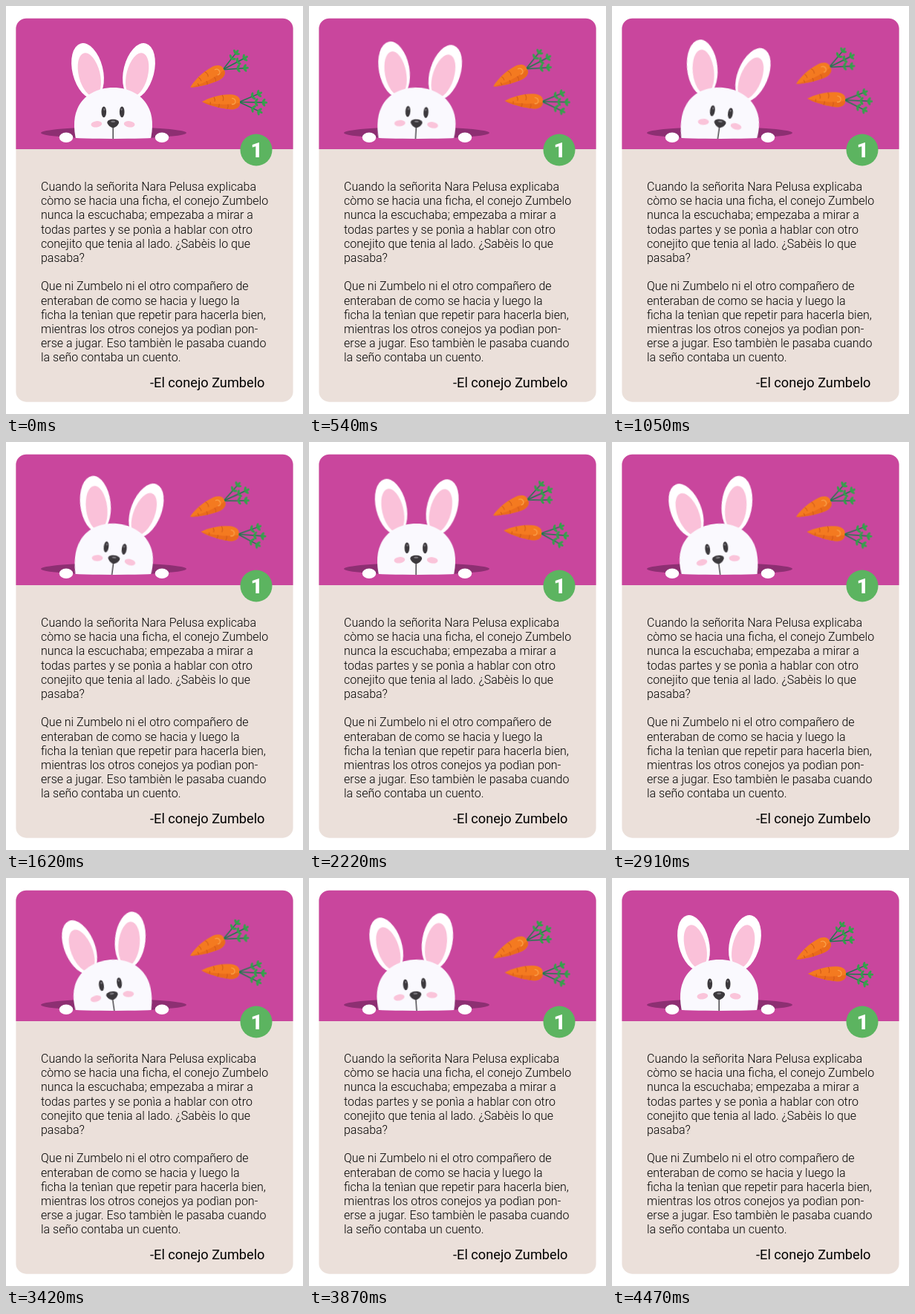
Write an HTML page that moves like this. It is 400x550 px and loops after 4.5 s.

```html
<!DOCTYPE html>
<html lang="es">
<head>
<meta charset="utf-8">
<title>El conejo Zumbelo</title>
<style>
  html, body { margin: 0; width: 100%; height: 100%; overflow: hidden; background: #fff; }
  svg { display: block; width: 400px; height: 550px; }
  text { font-family: Roboto, sans-serif; fill: #000; }
  #story { font-size: 16px; font-weight: 300; }
  #sign { font-size: 18.2px; }
  #num { font-size: 28px; font-weight: 900; fill: #fff; }
  #bunny { transform-origin: 145px 167px; }
  #carrots { transform-origin: 402px 100px; }
</style>
</head>
<body>
<svg viewBox="0 0 400 550">
  <defs>
    <clipPath id="card"><rect x="13.4" y="16.7" width="373.2" height="517" rx="14"/></clipPath>
    <clipPath id="hole"><path d="M0 0H400V171H243A98 8 0 0 1 47 171H0Z"/></clipPath>
    <g id="ear">
      <ellipse cx="110" cy="87.3" rx="20.5" ry="38" transform="rotate(-14 110 87.3)" fill="#fff"/>
      <ellipse cx="112.3" cy="92.5" rx="14.3" ry="30" transform="rotate(-14 112.3 92.5)" fill="#fac1d9"/>
    </g>
    <g id="face">
      <ellipse cx="131.8" cy="142.8" rx="3.3" ry="7.4" fill="#3c393d"/>
      <ellipse cx="132.3" cy="139.5" rx="1" ry="1.4" fill="#77747a"/>
      <ellipse cx="121.8" cy="159.3" rx="7.4" ry="4.2" transform="rotate(-8 122 159)" fill="#fac4da"/>
    </g>
    <g id="carrot">
      <g id="leaves"></g>
      <path d="M0 .5C9-5 24-10 38-10C48-10 52-5 51 0C52 6 47 10.5 38 10C24 9 9 5 0 .5Z" fill="#f47a20"/>
      <path d="M0 .5C15 4 35 5 51 1C52 6 47 10.5 38 10C24 9 9 5 0 .5Z" fill="#ea6b1c"/>
      <path d="M16-6q2 3 1 6M27-9q3 4 1 8M22 8q2-3 1-5M34 9.5q2-3 1-6M11 4.5q1-2 0-4" fill="none" stroke="#cf5a17"/>
      <path d="M40-5q5 0 5 5q-1 4-5 3" fill="none" stroke="#f9a04a" stroke-width="1.3"/>
    </g>
  </defs>

  <g clip-path="url(#card)">
    <rect width="400" height="550" fill="#ebe0da"/>
    <rect width="400" height="193" fill="#c9469d"/>
  </g>

  <ellipse cx="145" cy="171" rx="98" ry="7.7" fill="#8d2f72"/>
  <g clip-path="url(#hole)">
    <g id="bunny">
      <use href="#ear"/>
      <use href="#ear" transform="translate(289) scale(-1 1)"/>
      <path d="M97 190C91 172 90 152 96 139C104 120 123 110 144.500 110S185 120 193 139C199 152 198 172 192 190Z" fill="#faf9fe"/>
      <use href="#face"/>
      <use href="#face" transform="translate(288) scale(-1 1)"/>
      <path d="M144.200 160V190" stroke="#4a474b" stroke-width="1.500"/>
      <path id="nose" d="M144.200 152.800C149 152.800 152.300 154.300 152 157.300C151.700 160.300 147.200 164.300 144.200 164.300S136.700 160.300 136.400 157.300C136.100 154.300 139.700 152.800 144.200 152.800Z" fill="#3c393d"/>
      <ellipse cx="144.200" cy="155.800" rx="3" ry="1.300" fill="#77747a"/>
    </g>
  </g>
  <ellipse cx="81" cy="177.300" rx="9.200" ry="6.700" fill="#fff"/>
  <ellipse cx="210" cy="177.300" rx="9.200" ry="6.700" fill="#fff"/>

  <g id="carrots">
    <use href="#carrot" transform="translate(248 109.200) rotate(-28)"/>
    <use href="#carrot" transform="translate(264 128.600) rotate(1)"/>
  </g>

  <circle cx="337" cy="194" r="21.500" fill="#5cb460"/>
  <text id="num" x="337.500" y="204" text-anchor="middle">1</text>
  <g id="story"></g>
  <text id="sign" x="348.500" y="514" text-anchor="end">-El conejo Zumbelo</text>
</svg>
<script>
const $ = id => document.getElementById(id);
const add = (parent, tag, attrs) => {
  const el = document.createElementNS('http://www.w3.org/2000/svg', tag);
  for (const key in attrs) el.setAttribute(key, attrs[key]);
  return parent.appendChild(el);
};

const lines = [
  'Cuando la señorita Nara Pelusa explicaba',
  'còmo se hacia una ficha, el conejo Zumbelo',
  'nunca la escuchaba; empezaba a mirar a',
  'todas partes y se ponìa a hablar con otro',
  'conejito que tenia al lado. ¿Sabèis lo que',
  'pasaba?',
  '',
  'Que ni Zumbelo ni el otro compañero de',
  'enteraban de como se hacia y luego la',
  'ficha la tenìan que repetir para hacerla bien,',
  'mientras los otros conejos ya podìan pon-',
  'erse a jugar. Eso tambièn le pasaba cuando',
  'la seño contaba un cuento.'
];
lines.forEach((line, i) => {
  add($('story'), 'text', { x: 47, y: 249 + i * 19.2 }).textContent = line;
});

// A frond is a stem with paired leaflets and one at the end.
function frond(x, y) {
  const turn = Math.atan2(y, x - 50) * 180 / Math.PI;
  const leaf = (at, side) => {
    const cx = 50 + (x - 50) * at, cy = y * at;
    add($('leaves'), 'ellipse', {
      cx: 3, cy: 0, rx: 3.2, ry: 1.6, fill: '#35a04b',
      transform: `translate(${cx} ${cy}) rotate(${turn + side * 55})`
    });
  };
  add($('leaves'), 'path', {
    d: `M50 0L${x} ${y}`, stroke: '#1d7a4c', 'stroke-width': 1.5
  });
  for (const at of [.65, .95]) { leaf(at, -1); leaf(at, 1); }
  leaf(.97, 0);
}
[[76, -11.5], [83, 0], [77, 12]].forEach(end => frond(...end));

const swing = (id, steps) => $(id).animate(
  steps.map(([time, angle]) => ({ offset: time / 4500, transform: `rotate(${angle}deg)`, easing: 'ease-in-out' })),
  { duration: 4500, iterations: Infinity }
);
swing('bunny', [[0, 0], [1250, 8.5], [3250, -8.5], [4500, 0]]);
swing('carrots', [[0, 0], [2250, 4], [4500, 0]]);
</script>
</body>
</html>
```
